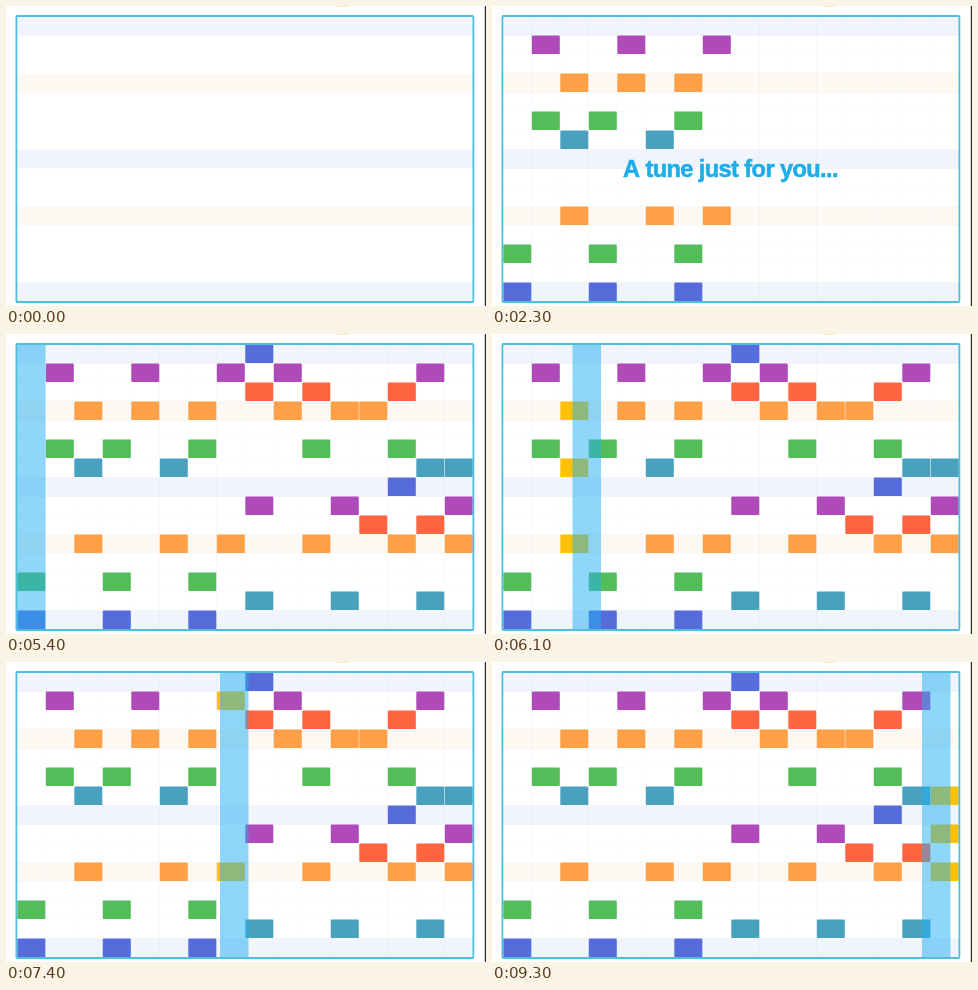
An HTML page with a canvas for the animation above (9400 ms loop, 480 by 300 pixels).

```html
<!DOCTYPE html>
<html lang="en">
<head>
<meta charset="utf-8">
<style>
html, body { margin: 0; width: 100%; height: 100%; overflow: hidden; background: #fff; }
canvas { display: block; }
</style>
</head>
<body>
<canvas id="stage" width="480" height="300"></canvas>
<script>
const ctx = document.getElementById('stage').getContext('2d');
const LOOP = 9400, STEP = 100;
const COLS = 16, ROWS = 15, COL = 28.5, ROW = 19, LEFT = 11, TOP = 10.5;
const palette = ['#566cda', '#ae4bb8', '#ff6541', '#ffa047', '#ffc107', '#54bc59', '#4aa1be'];

// One word per column, one hex digit per sounding row
const tune = 'ce 15 36a 5ce 13 6a 35ce 1a 028d 13 25a 38d 39 257a 169d 68a'.split(' ');

// Playhead: time, left edge
const path = [[5400, 11], [6100, 80.5], [7400, 214], [8400, 325], [9300, 430]];

const ramp = (t, a, b) => Math.max(0, Math.min(1, (t - a) / (b - a)));

function box(x, y, w, h, color) {
  ctx.fillStyle = color;
  ctx.fillRect(x, y, w, h);
}

const headX = t => path.slice(1).reduce((x, [t1, x1], i) => {
  const [t0, x0] = path[i];
  return x + (x1 - x0) * ramp(t, t0, t1);
}, LEFT);

function drawGrid(t) {
  const line = 'rgba(110,150,185,.05)';
  box(0, 0, 480, 300, '#fff');
  for (let r = 0; r < ROWS; r++) {
    const y = TOP + r * ROW;
    if (r % 7 === 0) box(LEFT, y, COLS * COL, ROW, '#f1f5fb');
    if (r % 7 === 3) box(LEFT, y, COLS * COL, ROW, '#fdf9f2');
    if (t >= 300) box(LEFT, y - 0.5, COLS * COL, 1, line);
  }
  if (t < 300) return;
  for (let c = 1; c < COLS; c++) box(LEFT + c * COL - 0.5, TOP, 1, ROWS * ROW, line);
}

function drawNotes(t, active) {
  tune.forEach((rows, c) => {
    if (t < 300 + c * 270) return;
    for (const digit of rows) {
      const r = parseInt(digit, 16);
      ctx.fillStyle = c === active ? '#ffc107' : palette[r % 7];
      ctx.beginPath();
      ctx.roundRect(LEFT + 0.3 + c * COL, TOP + r * ROW, 28, 18.6, 1.2);
      ctx.fill();
    }
  });
}

function drawFrame() {
  ctx.strokeStyle = '#4dbfdc';
  ctx.lineWidth = 1.8;
  ctx.beginPath();
  ctx.roundRect(10.4, 10, 457, 286, 1);
  ctx.stroke();
  box(478.8, 0, 1.2, 300, '#2a2a2a');
  ctx.fillStyle = '#f9ebb8';
  ctx.beginPath();
  ctx.ellipse(337, -1, 8, 2, 0, 0, 7);
  ctx.fill();
}

function drawTitle(t) {
  ctx.globalAlpha = ramp(t, 500, 900) * (1 - ramp(t, 4600, 5100));
  ctx.fillStyle = ctx.strokeStyle = '#1eade6';
  ctx.font = 'bold 23.6px "Liberation Sans", Arial, sans-serif';
  ctx.letterSpacing = '-0.6px';
  ctx.textAlign = 'center';
  ctx.lineWidth = 0.6;
  ctx.fillText('A tune just for you...', 238.5, 171);
  ctx.strokeText('A tune just for you...', 238.5, 171);
  ctx.globalAlpha = 1;
}

function draw(now) {
  const t = Math.floor(now % LOOP / STEP) * STEP;
  const x = headX(t);
  drawGrid(t);
  drawNotes(t, t > path[0][0] ? Math.round((x - LEFT) / COL) : -1);
  if (t >= 5300) box(x, TOP, COL, ROWS * ROW, 'rgba(32,175,243,.5)');
  drawFrame();
  drawTitle(t);
  requestAnimationFrame(draw);
}
draw(0);
</script>
</body>
</html>
```
